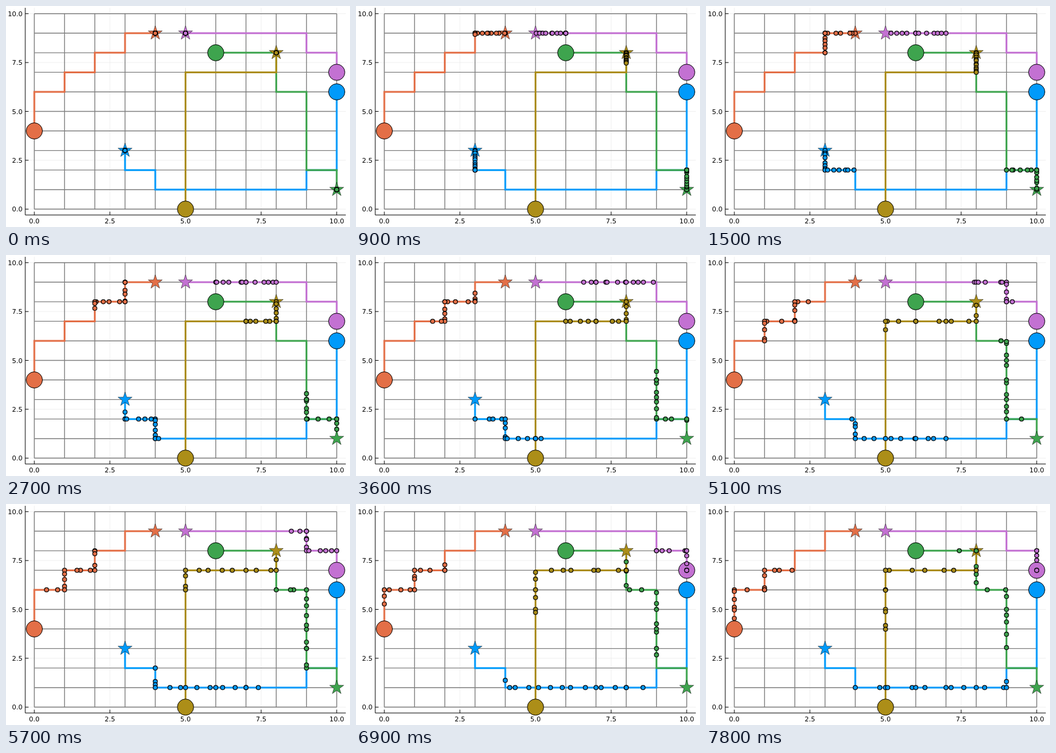
These frames come from a looping animation (572x368 px, 8 s). An HTML page:

```html
<!DOCTYPE html>
<html lang="en">
<head>
<meta charset="utf-8">
<title>Routes on a grid</title>
<style>
  html, body { margin: 0; width: 100%; height: 100%; overflow: hidden; background: #fff; }
  svg { display: block; width: 572px; height: 368px; }
  text { font: 11px "DejaVu Sans", sans-serif; }
</style>
</head>
<body>
<svg id="stage" viewBox="0 0 572 368"></svg>
<script>
const LOOP = 8000, STEP = 300;
const KEYS = [0, 5, 15, 26]; // steps at which tail and head are given
const WAIT = 0.3;            // share of each edge's time spent waiting at its nodes

// path: corners from star to disc; tail, head: distance of the last and first dot
const routes = [
  { color: '#009afa', count: 15, tail: [0, 0, 1.5, 3], head: [0, 1.9, 5.5, 8.6],
    path: [[3,3],[3,2],[4,2],[4,1],[9,1],[9,2],[10,2],[10,6]] },
  { color: '#e36f47', count: 15, tail: [0, 0, 2, 4], head: [0, 2, 5.5, 8.5],
    path: [[4,9],[3,9],[3,8],[2,8],[2,7],[1,7],[1,6],[0,6],[0,4]] },
  { color: '#3ea44e', count: 14, tail: [0, 0, 1, 3], head: [0, 2, 5.8, 9.9],
    path: [[10,1],[10,2],[9,2],[9,6],[8,6],[8,8],[6,8]] },
  { color: '#c371d2', count: 13, tail: [0, 0.2, 2, 5.8], head: [0, 2, 4.7, 8.6],
    path: [[5,9],[9,9],[9,8],[10,8],[10,7]] },
  { color: '#ac8e18', count: 13, tail: [0, 0, 0, 1], head: [0, 0.9, 4, 7.4],
    path: [[8,8],[8,7],[5,7],[5,0]] }
];

// Plot area, with the data range padded by 3 % on each side
const LEFT = 32, RIGHT = 565, TOP = 3, BOTTOM = 348;
const px = x => LEFT + (RIGHT - LEFT) * (x + 0.3) / 10.6;
const py = y => BOTTOM - (BOTTOM - TOP) * (y + 0.3) / 10.6;

const stage = document.getElementById('stage');

function add(tag, attrs, text = '') {
  const el = document.createElementNS(stage.namespaceURI, tag);
  for (const name in attrs) el.setAttribute(name, attrs[name]);
  el.textContent = text;
  return stage.appendChild(el);
}
const line = (x1, y1, x2, y2, stroke, width = 1) =>
  add('line', { x1, y1, x2, y2, stroke, 'stroke-width': width });
const disc = (x, y, r, fill, width) =>
  add('circle', { cx: px(x), cy: py(y), r, fill, stroke: '#000', 'stroke-width': width });

function star(x, y, fill) {
  const points = Array.from({ length: 10 }, (_, i) => {
    const r = i % 2 ? 4.8 : 12.3, a = i * Math.PI / 5;
    return [px(x) + r * Math.sin(a), py(y) - r * Math.cos(a)];
  });
  add('polygon', { points: points.join(' '), fill, stroke: '#000', 'stroke-width': 0.5 });
}

function drawAxes() {
  const ticks = [0, 2.5, 5, 7.5, 10];
  for (const v of ticks) {
    line(px(v), TOP, px(v), BOTTOM, '#e8e8e8', 0.7);
    line(LEFT, py(v), RIGHT, py(v), '#e8e8e8', 0.7);
  }
  line(LEFT, TOP, LEFT, BOTTOM, '#000');
  line(LEFT, BOTTOM, RIGHT, BOTTOM, '#000');
  for (const v of ticks) {
    line(px(v), BOTTOM, px(v), BOTTOM - 5.5, '#000');
    line(LEFT, py(v), LEFT + 5.5, py(v), '#000');
    add('text', { x: px(v), y: 362, 'text-anchor': 'middle' }, v.toFixed(1));
    add('text', { x: 27.5, y: py(v) + 4, 'text-anchor': 'end' }, v.toFixed(1));
  }
  for (let i = 0; i <= 10; i++) {
    line(px(i), py(10), px(i), py(0), '#808080', 1.4);
    line(px(0), py(i), px(10), py(i), '#808080', 1.4);
  }
}

// Point at distance d along a path, or null past its end
function walk(path, d) {
  for (let i = 1; i < path.length; i++) {
    const [x, y] = path[i - 1], [u, v] = path[i];
    const len = Math.abs(u - x) + Math.abs(v - y);
    if (d <= len) return [x + (u - x) * d / len, y + (v - y) * d / len];
    d -= len;
  }
  return null;
}

let seed = 7;
function random() {
  seed = seed * 16807 % 2147483647;
  return seed / 2147483647;
}

const mix = (a, b, t) => a + (b - a) * t;

function keyed(values, step) {
  const i = KEYS.findIndex(k => k >= step);
  return i < 1 ? values[0]
    : mix(values[i - 1], values[i], (step - KEYS[i - 1]) / (KEYS[i] - KEYS[i - 1]));
}

// Hold each dot at the nodes before and after every edge
function pause(d) {
  const node = Math.floor(d);
  return node + Math.min(1, Math.max(0, (d - node - WAIT / 2) / (1 - WAIT)));
}

drawAxes();
for (const { path, color } of routes) {
  const points = path.map(([x, y]) => [px(x), py(y)]).join(' ');
  add('polyline', { points, fill: 'none', stroke: color, 'stroke-width': 3 });
}
for (const { path, color } of routes) {
  star(...path[0], color);
  disc(...path[path.length - 1], 13.5, color, 1);
}
for (const route of routes) {
  route.dots = Array.from({ length: route.count }, (_, i) => ({
    rank: (i + random()) / route.count,
    el: disc(...route.path[0], 3.5, route.color, 1.2)
  }));
}

function render() {
  const step = Math.floor(performance.now() % LOOP / STEP);
  for (const { path, tail, head, dots } of routes) {
    const last = keyed(tail, step), first = keyed(head, step);
    for (const { rank, el } of dots) {
      const at = walk(path, pause(mix(last, first, rank)));
      el.setAttribute('visibility', at ? 'visible' : 'hidden');
      if (!at) continue;
      el.setAttribute('cx', px(at[0]));
      el.setAttribute('cy', py(at[1]));
    }
  }
  requestAnimationFrame(render);
}
render();
</script>
</body>
</html>
```
